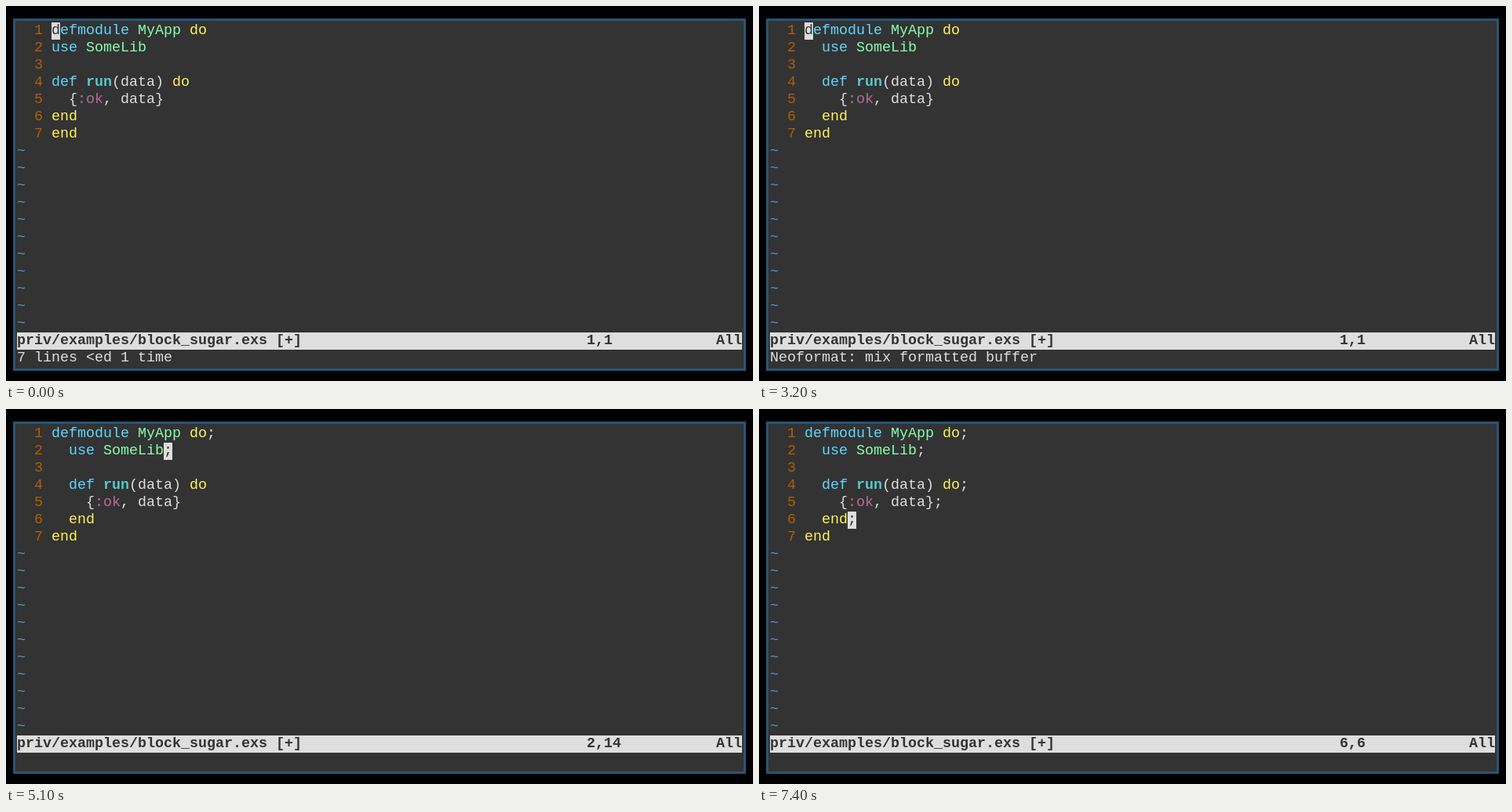
Write an HTML page that moves like this. It is 952x479 px and loops after 8 s.

```html
<!DOCTYPE html>
<html lang="en">
<head>
<meta charset="utf-8">
<title>Editor session</title>
<style>
  :root { --bg: #333; --fg: #dedede; }
  html, body { margin: 0; width: 100%; height: 100%; overflow: hidden; background: #000; }
  #term {
    position: absolute; left: 9px; top: 16px; width: 924px; height: 440px;
    padding: 2px; border: 3px solid #285577; background: var(--bg); color: var(--fg);
    font: 18.33px/22px "Liberation Mono", monospace;
    font-variant-ligatures: none; white-space: pre;
  }
  .row { position: relative; height: 22px; }
  .row span { position: absolute; top: 0; height: 22px; }
  .num { color: #af5f00; }
  .key { color: #5fd7ff; }
  .type { color: #87ffaf; }
  .stmt { color: #fff35c; }
  .func { color: #55c9cd; font-weight: bold; }
  .atom { color: #b56c96; }
  .tilde { color: #5297c0; }
  .bold { font-weight: bold; }
  .status { background: var(--fg); color: var(--bg); font-weight: bold; }
  .menu { background: #b56c96; color: #222; }
  .match { background: #3fb0b4; }
  .cursor { background: var(--fg); color: var(--bg); }
</style>
</head>
<body>
<div id="term"></div>
<script>
const LOOP = 8000, ROWS = 20, COLS = 84, CELL = 11, GUTTER = 4;

const code = [
  [["key", "defmodule"], ["", " "], ["type", "MyApp"], ["", " "], ["stmt", "do"]],
  [["key", "use"], ["", " "], ["type", "SomeLib"]],
  [],
  [["key", "def"], ["", " "], ["func", "run"], ["", "(data) "], ["stmt", "do"]],
  [["", "{"], ["atom", ":ok"], ["", ", data}"]],
  [["stmt", "end"]],
  [["stmt", "end"]]
];

const menu = [["do", "[~] A"], ["defmodule", "[~] A"], ["do", "[US]"], ["docf", "[US]"], ["doc", "[US]"]];

// Each step changes part of the editor state from its time on.
const steps = [
  [0, { indent: [0, 0, 0, 0, 2, 0, 0], semis: "", at: [1, 1], focus: "code",
        cmd: "7 lines <ed 1 time", menu: false, match: null }],
  [400, { indent: [0, 0, 0, 0, 0, 0, 0] }],
  [1300, { focus: "cmd", cmd: ":" }],
  [1600, { cmd: ":N" }],
  [1700, { cmd: ":Ne" }],
  [1900, { cmd: ":Neo" }],
  [2100, { cmd: ":Neoformat" }],
  [2700, { focus: "none" }],
  [3200, { indent: [0, 2, 0, 2, 4, 2, 0], focus: "code", cmd: "Neoformat: mix formatted buffer" }],
  [3800, { at: [1, 19], cmd: "-- INSERT --" }],
  [3900, { menu: true }],
  [4400, { at: [1, 20], semis: "1", menu: false }],
  [4600, { at: [1, 19], cmd: "" }],
  [4700, { at: [2, 13] }],
  [5100, { at: [2, 14], semis: "12" }],
  [5300, { at: [3, 0] }],
  [5500, { at: [4, 14] }],
  [5900, { at: [4, 19], semis: "124" }],
  [6200, { at: [5, 15], match: [5, 5] }],
  [6400, { at: [5, 16], semis: "1245", match: null }],
  [6800, { at: [6, 5] }],
  [7400, { at: [6, 6], semis: "12456" }]
];

const rows = Array.from({ length: ROWS }, () => {
  const row = document.createElement("div");
  row.className = "row";
  return document.getElementById("term").appendChild(row);
});

function buildGrid(s) {
  const grid = rows.map(() => Array.from({ length: COLS }, () => ({ ch: " ", cls: "" })));
  const put = (row, col, text, cls) => {
    for (const ch of text) grid[row][col++] = { ch, cls };
    return col;
  };
  const mark = (row, col, cls) => { grid[row][col].cls = cls; };

  code.forEach((line, i) => {
    put(i, 0, String(i + 1).padStart(3), "num");
    let col = GUTTER + s.indent[i];
    for (const [cls, text] of line) col = put(i, col, text, cls);
    if (s.semis.includes(i + 1)) put(i, col, ";", "");
  });
  for (let r = code.length; r < ROWS - 2; r++) put(r, 0, "~", "tilde");

  const [line, col] = s.at;
  const pos = `${line},${col || "0-1"}`;
  const status = "priv/examples/block_sugar.exs [+]".padEnd(66) + pos.padEnd(15) + "All";
  put(ROWS - 2, 0, status, "status");
  put(ROWS - 1, 0, s.cmd, s.cmd.startsWith("--") ? "bold" : "");

  if (s.menu) menu.forEach(([word, kind], i) =>
    put(i + 1, 19, " " + word.padEnd(10) + kind.padEnd(6), "menu"));
  if (s.match) mark(s.match[0] - 1, GUTTER + s.match[1] - 1, "match");
  if (s.focus === "code") mark(line - 1, GUTTER + Math.max(col, 1) - 1, "cursor");
  if (s.focus === "cmd") mark(ROWS - 1, s.cmd.length, "cursor");
  return grid;
}

function draw(s) {
  buildGrid(s).forEach((cells, r) => {
    const runs = [];
    let run;
    cells.forEach(({ ch, cls }, col) => {
      if (!run || run.className !== cls) {
        run = document.createElement("span");
        run.className = cls;
        run.style.left = col * CELL + "px";
        runs.push(run);
      }
      run.textContent += ch;
    });
    rows[r].replaceChildren(...runs);
  });
}

let shown = -1;
function tick() {
  const t = performance.now() % LOOP;
  const index = steps.filter(([start]) => start <= t).length;
  if (index !== shown) {
    draw(Object.assign({}, ...steps.slice(0, index).map(([, patch]) => patch)));
    shown = index;
  }
  requestAnimationFrame(tick);
}
tick();
</script>
</body>
</html>
```
